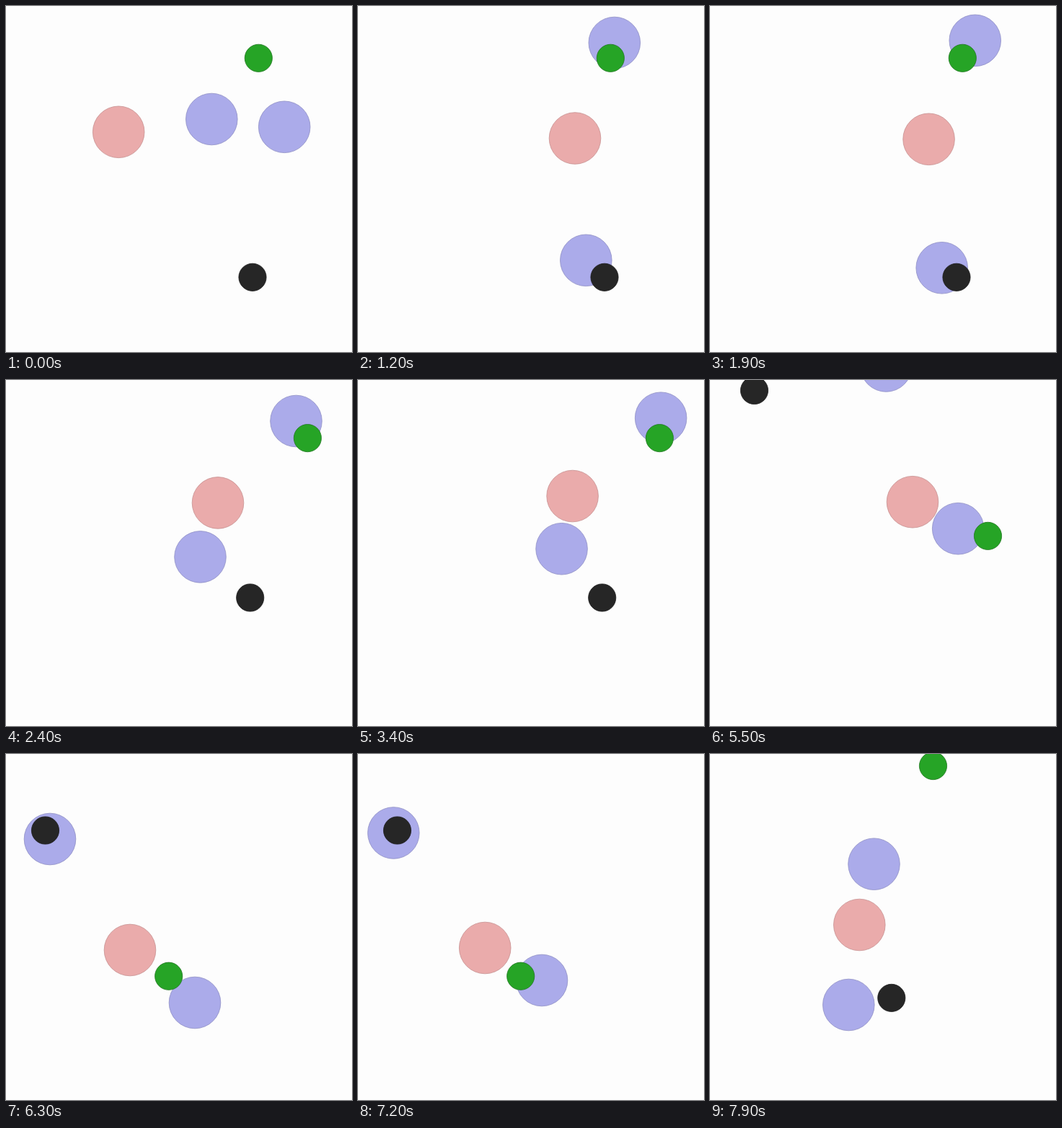
An HTML page with a canvas for the animation above (8 s loop, 480 by 480 pixels).

```html
<!DOCTYPE html>
<html lang="en">
<head>
<meta charset="utf-8">
<title>Particle agents</title>
<style>
html, body { margin: 0; width: 100%; height: 100%; overflow: hidden; background: #fdfdfd; }
canvas { display: block; width: 480px; height: 480px; }
</style>
</head>
<body>
<canvas id="stage" width="480" height="480"></canvas>
<script>
const ctx = document.getElementById('stage').getContext('2d');
const TICK = 100, TICKS = 80, ROUND = 18, ARRIVE = 4;
const HOLDS = [5, 18, 30, 42, 54, 67]; // ticks on which nothing moves

// path: start, arrival, position at step `mark`; sway: jitter around the goal
const rounds = [
  { mark: 11, green: [350.3, 72.3], black: [342, 376.3], agents: [
    { path: [156.2, 174.8, 298, 182, 301, 183.5] },
    { path: [285.3, 157, 310, 345, 316.3, 352.8], sway: [0, 11] },
    { path: [386.2, 167.8, 362, 45, 355.8, 51], sway: [50, -24] }] },
  { mark: 14, green: [418.4, 80.6], black: [338.7, 302], agents: [
    { path: [214, 225, 294, 170.4, 298, 160] },
    { path: [296, 442, 269.5, 245.4, 284, 233] },
    { path: [432, 190, 402.5, 57, 406, 58], sway: [42, -15] }] },
  { mark: 14, green: [385.5, 216.4], black: [61.5, 14.5], agents: [
    { path: [478, 250, 282, 150.4, 281, 169.2] },
    { path: [172, 95, 165, 10, 244.3, -19.5], sway: [-20, 0] },
    { path: [332, 356, 325.2, 212, 344.2, 206.2], sway: [48, -8] }] },
  { mark: 12, green: [225.7, 308.2], black: [54.5, 106], agents: [
    { path: [135, 300, 172, 272, 176.2, 269] },
    { path: [150, 180, 61, 118, 49.3, 109.5], sway: [-10, -20] },
    { path: [340, 260, 262, 345, 255, 314], sway: [12, 0] }] },
  { mark: 14, green: [309.5, 16.5], black: [251.8, 338.4], agents: [
    { path: [203.3, 245, 235.3, 181, 235.3, 181] },
    { path: [221.5, 160.7, 269.5, 96.7, 269.5, 96.7] },
    { path: [190.3, 354, 206.3, 306, 206.3, 306] }] },
];

const mix = (a, b, p) => a + (b - a) * p;

function place({ path, sway = [0, 0] }, step, mark) {
  const early = step <= ARRIVE;
  const p = early ? (step / ARRIVE) ** 1.5 : (step - ARRIVE) / (mark - ARRIVE);
  const from = early ? 0 : 2;
  const w = early ? 0 : Math.sin(Math.PI * (step - mark) / 5) ** 2;
  return [0, 1].map(i => mix(path[from + i], path[from + 2 + i], p) + sway[i] * w);
}

function disc([x, y], r, fill, edge) {
  ctx.beginPath();
  ctx.arc(x, y, r, 0, Math.PI * 2);
  ctx.fillStyle = fill;
  ctx.fill();
  ctx.strokeStyle = edge;
  ctx.stroke();
}

function draw(now) {
  const tick = Math.floor(now / TICK) % TICKS;
  const total = tick - HOLDS.filter(h => h <= tick).length;
  const { mark, green, black, agents } = rounds[Math.floor(total / ROUND)];
  const step = total % ROUND;
  ctx.fillStyle = '#fdfdfd';
  ctx.fillRect(0, 0, 480, 480);
  ctx.lineWidth = 0.8;
  agents.forEach((agent, i) => {
    const [fill, edge] = i ? ['#ababea', '#8f8fc4'] : ['#eaabab', '#c79090'];
    disc(place(agent, step, mark), 35.8, fill, edge);
  });
  disc(green, 19.1, '#26a426', '#1f751f');
  disc(black, 19.1, '#262626', '#1c1c1c');
}

const start = performance.now();
function loop() {
  draw(performance.now() - start);
  requestAnimationFrame(loop);
}
loop();
</script>
</body>
</html>
```
